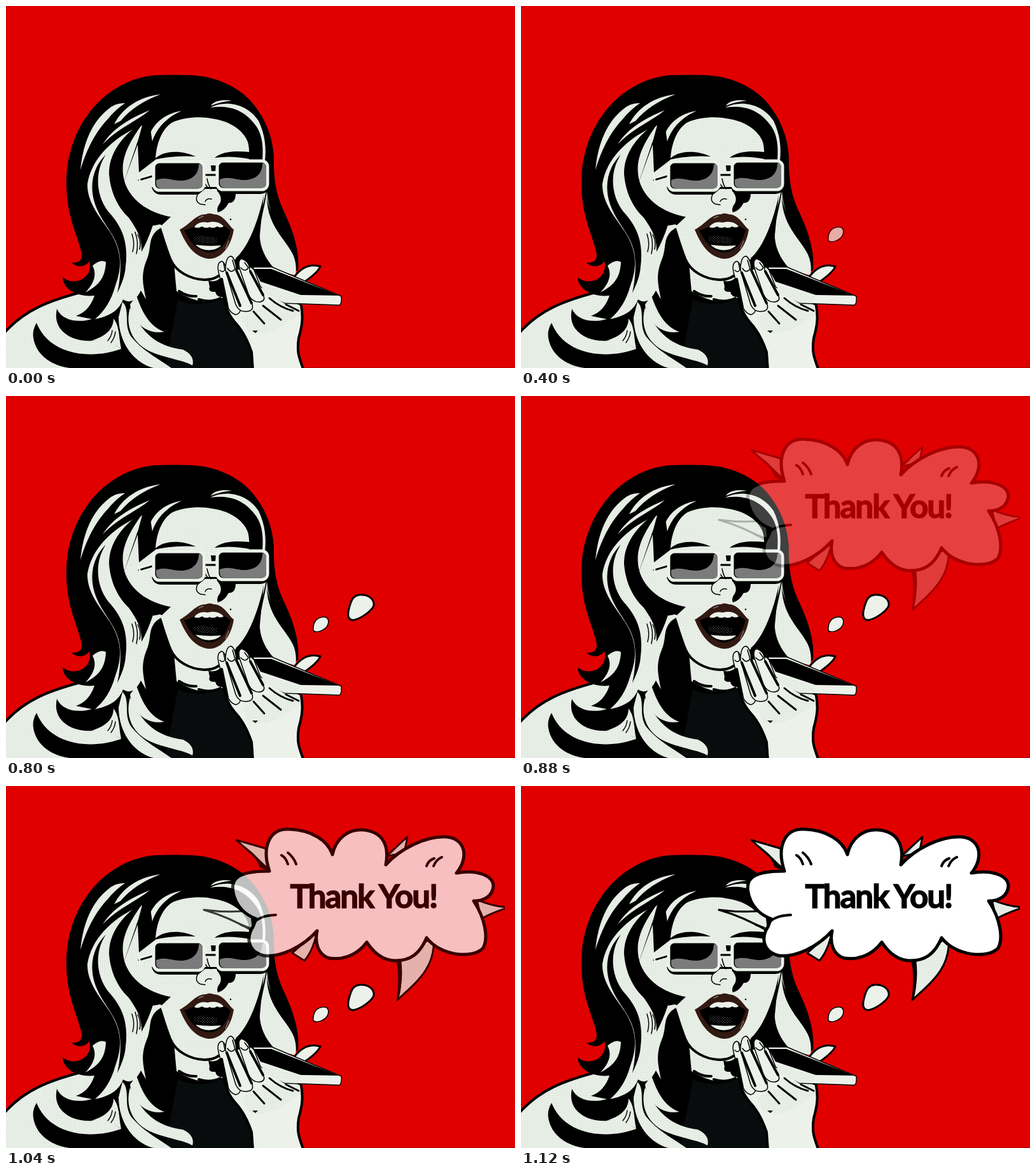
An HTML page that plays this animation: 800x570 px, repeating every 2000 ms.

```html
<!DOCTYPE html>
<html lang="en">
<head>
<meta charset="utf-8">
<title>Thank You!</title>
<style>
  html, body { margin: 0; width: 100%; height: 100%; overflow: hidden; background: #e00000; }
  svg { display: block; width: 800px; height: 570px; }
  .skin { fill: url(#dots); }
  .pale { fill: #ecf2ea; }
  .grey { fill: #7b7b7b; }
  .lip { fill: #321912; }
  .line { fill: none; stroke: #000; stroke-width: 4; stroke-linecap: round; stroke-linejoin: round; }
  .mid { stroke-width: 3; }
  .thin { stroke-width: 1.5; }
  .ink { stroke: #000; stroke-width: 3; stroke-linejoin: round; }
  .fine { stroke: #000; stroke-width: 1.5; stroke-linejoin: round; }
  text { font: bold 51px Lato, "Open Sans", sans-serif; letter-spacing: -2px; stroke: #000; stroke-width: 1.4; }
</style>
</head>
<body>
<svg viewBox="0 0 800 570">
  <defs>
    <pattern id="dots" width="3" height="3" patternUnits="userSpaceOnUse">
      <path fill="#e9f0e7" d="M0 0h3v3H0z"/><path fill="#cfd6cd" d="M1 1h1v1H1z"/>
    </pattern>
    <pattern id="grain" width="4" height="4" patternUnits="userSpaceOnUse">
      <path fill="#777" d="M0 0h1v1H0zM2 2h1v1H2z"/>
    </pattern>
    <clipPath id="edge"><path d="M0 0h784v570H0z"/></clipPath>
  </defs>
  <path fill="#b00000" d="M466 569h334v1H466z"/>

  <!-- shoulder, hair and dress -->
  <path class="skin" d="M0 514C28 480 65 464 125 449L200 480V570H0Z"/>
  <path class="line" d="M-2 514C28 480 65 464 125 449"/>
  <path d="M235 109C262 108 296 108 311 111C348 118 376 137 390 156C409 180 419 207 421 237C420 276 426 302 438 326C450 352 462 384 459 416L400 440L345 420L390 530V570H100C75 567 48 552 43 523Q41 510 48 499C56 519 72 535 97 543C125 552 155 549 181 540C165 528 153 523 137 527C105 530 72 512 80 477C88 494 110 500 135 493L110 488C124 483 134 472 139 456C116 459 90 448 89 427C100 437 120 436 129 421Q134 411 131 402C124 412 111 412 103 404C117 405 121 398 118 386C112 360 96 332 95 285C93 243 107 200 128 172C150 140 190 112 235 109Z"/>
  <path fill="#090c0d" d="M270 462C295 474 325 469 343 460L390 530V570H250Z"/>

  <!-- highlights on the crown -->
  <path class="skin" d="M117 258C121 215 136 182 160 163Q172 152 187 153Q172 163 160 178C142 197 128 222 117 258Z"/>
  <path class="skin" d="M170 186C183 161 208 143 243 139C216 149 195 163 180 181Z"/>
  <path class="skin" d="M152 218C168 192 195 177 226 164C206 181 176 192 152 218Z"/>
  <path class="skin" d="M221 232C219 200 238 171 276 165C247 178 229 200 226 232Z"/>
  <path class="skin" d="M321 160C345 147 380 154 397 181C408 204 409 225 407 244H403C405 218 402 199 390 185C372 162 348 156 321 160Z"/>
  <path class="skin" d="M322 157C327 149 341 147 355 149Q336 151 322 157Z"/>

  <!-- long locks on the left -->
  <path class="skin" d="M214 188C170 205 134 240 128 280C127 310 150 335 163 355C182 385 183 410 172 440C165 465 155 480 140 493C165 488 178 478 184 462C196 470 205 462 212 448L220 462C216 440 211 425 221 400C227 386 225 376 229 365Q234 352 249 347L240 343L186 275L208 210Z"/>
  <path d="M157 234C138 262 142 300 161 324C186 351 192 377 188 410C187 425 182 437 175 452C181 423 181 400 177 384C172 362 155 345 145 324C129 292 133 257 157 234Z"/>
  <path d="M218 181C181 203 161 235 162 265C165 306 190 342 220 346Q248 347 260 332C225 326 195 306 186 275C178 245 190 218 218 181Z"/>
  <path d="M169 297C190 335 215 352 213 387Q223 369 231 345L190 320Z"/>
  <path d="M226 187L205 218L209 263L218 245L221 260L234 241Z"/>
  <path class="line thin" d="M198 359Q203 374 199 387M203 356Q209 373 205 390M207 360Q213 371 210 383"/>
  <path class="skin" d="M136 409Q148 398 157 403C156 424 150 438 125 451C137 438 144 424 136 409Z"/>

  <!-- lower curls -->
  <path class="skin" d="M183 466C196 478 184 503 197 521C214 542 237 554 260 570H232C198 561 177 527 177 490Z"/>
  <path class="skin" d="M195 475C211 505 226 534 278 541C291 547 296 556 293 566C278 556 232 553 211 534C193 518 189 496 195 475Z"/>
  <path class="skin" d="M205 456C214 483 227 506 249 513C216 519 197 491 195 470Z"/>
  <path class="skin" d="M169 492C179 505 177 521 181 540C168 530 151 526 134 527C157 520 169 509 169 492Z"/>
  <path class="line thin" d="M160 527Q166 520 167 511M165 530Q171 522 172 513"/>

  <!-- right lock -->
  <path class="skin" d="M410 292C405 326 397 345 399 366C401 386 412 405 426 417L455 424C460 400 444 371 429 350C417 333 412 312 410 292Z"/>
  <path d="M410 300C415 342 449 358 455 402C447 371 410 352 410 300Z"/>

  <!-- face and neck -->
  <path class="skin" d="M264 405L268 449Q288 462 312 466Q334 466 342 458L337 420Z"/>
  <path d="M318 432Q328 437 340 426V458Q331 459 329 450Q317 451 320 442Z"/>
  <path class="line" d="M272 449Q285 458 299 457M303 462Q320 468 337 460"/>
  <path class="skin" d="M235 242C236 216 246 192 262 183C282 174 309 174 322 177C350 180 373 195 380 214Q383 224 382 243L409 290C402 326 393 352 383 366C375 383 360 401 350 409C333 432 316 433 299 427C280 420 266 414 261 400C254 383 248 362 243 347L259 332C225 326 195 306 186 275L207 218L209 262Z"/>
  <path class="line" d="M259 400C267 418 289 430 311 431Q330 432 342 418"/>
  <path d="M405 298C400 323 391 350 382 368Q374 386 361 397L404 415L415 409Q400 391 398 370Z"/>
  <path d="M233 242C246 226 278 227 298 237Q263 235 233 242ZM328 239C341 228 363 228 383 230L383 241Q354 235 328 239Z"/>
  <path d="M332 291H361Q362 311 350 310Q343 323 333 325Q330 319 336 311Q341 302 332 291ZM322 251H331L329 260H323Z"/>
  <path class="line thin" d="M301 297Q296 308 306 312L313 313M313 308Q316 302 323 304M316 272Q318 282 322 288M313 280L317 286"/>
  <circle cx="353" cy="336" r="1.3"/>

  <!-- glasses -->
  <path d="M229 285Q232 297 244 297H302L313 288H331Q332 296 344 296H400Q411 296 413 285Z"/>
  <path class="line mid" d="M209 274L233 267M311 266H334"/>
  <path class="line mid" style="stroke:#ecf2ea" d="M209 271L232 264M312 262H333M208 264L211 279"/>
  <g id="lens">
    <rect x="232" y="245" width="79" height="45" rx="9" stroke="#ecf2ea" stroke-width="5"/>
    <path class="grey" d="M236 274C252 268 262 276 278 275C296 273 303 262 303 249Q309 249 309 254V281Q309 287 303 287H243Q236 287 236 280Z"/>
  </g>
  <use href="#lens" x="100" y="-1"/>

  <!-- mouth -->
  <path class="lip" d="M273 352C288 345 299 327 314 328Q319 325 327 328C343 329 350 346 358 352C354 379 338 399 318 398C295 395 282 374 273 352Z"/>
  <path d="M280 353C295 350 302 341 317 343Q338 340 353 353C346 378 333 389 317 388C299 385 287 369 280 353Z"/>
  <path class="pale" d="M296 348Q303 338 317 341Q333 337 342 347Q337 350 332 347Q326 351 320 348Q314 351 308 347Q301 351 296 348ZM298 376Q317 379 338 377C330 386 310 388 298 376Z"/>
  <path fill="url(#grain)" d="M295 363Q312 360 333 366L330 374Q309 376 295 369Z"/>
  <path class="line thin" style="stroke:#80766f" d="M345 382L350 370M303 334L310 331"/>

  <!-- hand and phone -->
  <path class="pale ink" d="M455 424C464 413 477 405 494 410Q490 420 468 435L450 433Z"/>
  <path class="pale ink" d="M341 418C339 446 340 475 359 497Q376 515 386 545L388 574H468C460 552 457 545 460 523C466 502 467 490 464 471L435 455L385 410Z"/>
  <path class="line" d="M341 430C339 455 343 478 359 497Q376 515 386 545L388 574M464 472C467 490 466 502 460 523C457 545 460 552 468 574"/>
  <path class="skin" d="M381 513C407 522 433 508 461 485L462 472L435 462L370 490Z"/>
  <path class="pale fine" d="M388 411L418 411L527 457Q528 469 524 471L438 468L400 442Z"/>
  <path d="M389 414H417L524 456L463 455L400 434Z"/>
  <path class="skin" d="M401 438L462 456L459 468L437 467L405 451Z"/>
  <path class="pale fine" d="M334 419Q331 404 339 402Q346 404 348 425L368 470Q371 484 361 486Q350 483 346 466Z"/>
  <path class="pale fine" d="M345 416Q345 394 354 394Q361 398 362 416L387 470Q390 480 378 481Q366 482 361 470Z"/>
  <path class="pale fine" d="M367 413Q364 400 370 398Q383 402 383 416L405 457Q408 464 399 466Q387 467 381 454Z"/>
  <path class="line" d="M339 430L348 474M347 420L368 472M362 416L386 468M384 418L404 455"/>
  <path class="line thin" d="M336 416Q341 421 344 415L342 405M348 413Q354 422 360 414L356 400M369 412Q376 420 381 412L375 404"/>
  <path class="line mid" d="M389 481L406 500M404 472L432 494M414 460Q431 475 451 480M440 470L460 480"/>
  <path d="M387 511L396 511L392 515Z"/>

  <!-- speech -->
  <path id="small" class="pale fine" d="M498 348C506 347 509 354 505 362C500 370 486 374 483 369C482 358 487 349 498 348Z"/>
  <path id="large" class="pale ink" d="M556 313C570 312 579 320 578 330C574 340 555 352 545 353C535 352 537 340 541 328C544 318 548 314 556 313Z"/>
  <g id="cloud" clip-path="url(#edge)">
    <path class="skin ink" d="M362 85L410 99L416 134ZM597 111L631 80L626 105ZM740 179Q765 190 790 191Q765 199 747 209ZM450 263L469 275Q483 259 489 228ZM672 238C676 286 645 309 615 337C622 315 622 294 613 272ZM311 195Q350 200 385 196L389 229Q350 206 311 195Z"/>
    <path d="M362 85Q388 101 399 128L414 134Q390 103 362 85ZM311 195Q346 203 370 221L390 225Q357 211 311 195ZM748 209Q766 195 790 194L790 191Q766 199 748 209ZM613 272Q619 300 614 338Q626 312 621 272ZM600 111L631 80L606 106Z"/>
    <path fill="#fff" stroke="#000" stroke-width="5" stroke-linejoin="round" d="M414 134C401 95 415 66 445 68C480 69 506 86 513 108C519 80 540 68 560 69C591 71 603 92 597 124C620 98 660 79 690 80C721 81 729 111 708 137C740 131 765 141 766 157C765 173 752 181 735 181C754 210 758 240 750 255C735 272 684 269 661 239C650 265 635 275 612 275C590 275 575 258 567 246C550 269 525 274 508 271C490 266 485 246 489 228C465 255 430 270 405 267C380 261 377 239 388 222L393 209C362 198 352 166 358 151C365 135 395 134 414 134Z"/>
    <path class="line" d="M388 217Q398 204 424 203M433 109Q440 113 443 123M443 105Q452 112 456 123M661 126Q664 117 673 114M672 126Q676 116 685 112"/>
    <text x="562" y="192" text-anchor="middle">Thank You!</text>
  </g>
</svg>
<script>
  const parts = ["small", "large", "cloud"].map(id => document.getElementById(id));
  const step = 40, loop = 2000;
  // last hidden step and number of steps to full opacity
  const fades = [[0, 14], [14, 6], [20, 8]];

  function draw(now) {
    const tick = Math.floor(now % loop / step);
    fades.forEach(([start, count], i) => {
      parts[i].style.opacity = Math.max(0, Math.min(1, (tick - start) / count));
    });
    requestAnimationFrame(draw);
  }
  draw(performance.now());
</script>
</body>
</html>
```
